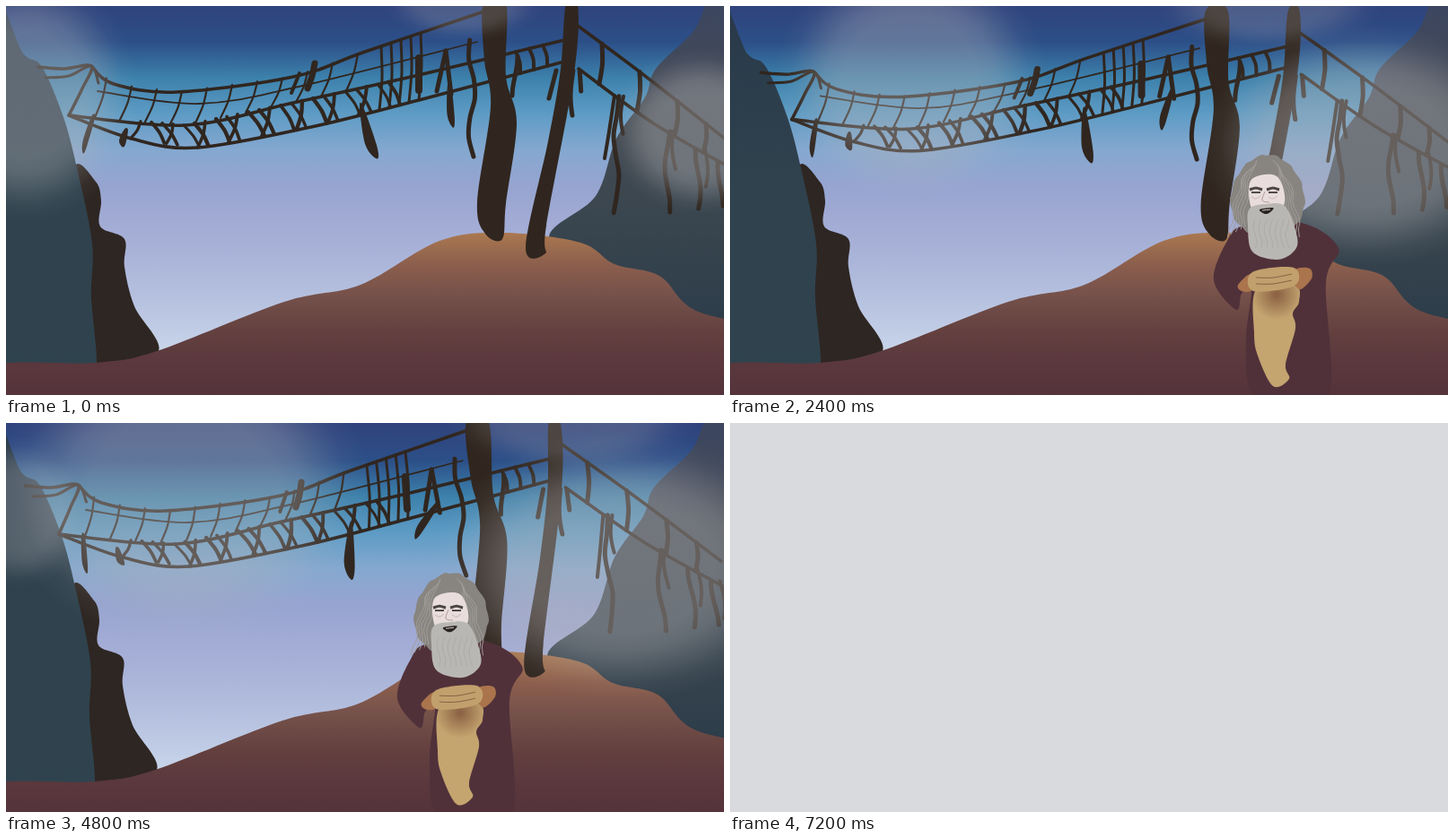
These frames come from a looping animation (800x434 px, 8000 ms). An HTML page with a canvas:

```html
<!DOCTYPE html>
<html lang="en">
<head>
<meta charset="utf-8">
<title>The old man at the rope bridge</title>
<style>
html, body { margin: 0; height: 100%; overflow: hidden; background: #d9dade; }
canvas { display: block; width: 100vw; height: 100vh; }
</style>
</head>
<body>
<canvas id="stage" width="800" height="434"></canvas>
<script>
const ctx = document.getElementById('stage').getContext('2d');
const WOOD = '#30261f', ROBE = '#50313a', MIST = '182,182,186', FOG = '217,218,222';
const STEP = 800, STEPS = 10, GROUND = 265;

// Smooth progress of a step number from one step to another.
function ease(step, from, to) {
  const t = Math.min(1, Math.max(0, (step - from) / (to - from)));
  return t * t * (3 - 2 * t);
}

// Repeatable value from 0 to 1.
function random(seed) {
  const v = Math.sin(seed * 127.1) * 43758.5;
  return v - Math.floor(v);
}

function points(text) {
  const n = text.split(/\s+/).map(Number);
  return Array.from({ length: n.length / 2 }, (_, i) => [n[2 * i], n[2 * i + 1]]);
}

const sample = (count, at) => Array.from({ length: count }, (_, i) => at(i / (count - 1)));

// Catmull-Rom curve through points.
function smooth(source, closed) {
  const p = typeof source === 'string' ? points(source) : source;
  const n = p.length, path = new Path2D();
  const at = i => closed ? p[(i + n) % n] : p[Math.max(0, Math.min(n - 1, i))];
  path.moveTo(...p[0]);
  for (let i = 0; i < (closed ? n : n - 1); i++) {
    const [a, b, c, d] = [at(i - 1), at(i), at(i + 1), at(i + 2)];
    path.bezierCurveTo(b[0] + (c[0] - a[0]) / 6, b[1] + (c[1] - a[1]) / 6,
      c[0] - (d[0] - b[0]) / 6, c[1] - (d[1] - b[1]) / 6, ...c);
  }
  return path;
}

function shape(source, fill) {
  ctx.fillStyle = fill;
  ctx.fill(smooth(source, true));
}

function line(source, width, color = WOOD) {
  ctx.strokeStyle = color;
  ctx.lineWidth = width;
  ctx.stroke(smooth(source));
}

function vertical(y0, y1, ...colors) {
  const g = ctx.createLinearGradient(0, y0, 0, y1);
  colors.forEach((color, i) => g.addColorStop(i / (colors.length - 1), color));
  return g;
}

function cloud(x, y, rx, ry, alpha, rgb = MIST) {
  ctx.save();
  ctx.translate(x, y);
  ctx.scale(rx, ry);
  const g = ctx.createRadialGradient(0, 0, 0, 0, 0, 1);
  for (let r = 0; r <= 1; r += .125)
    g.addColorStop(r, `rgba(${rgb},${alpha * (1 - ease(r, .5, 1))})`);
  ctx.fillStyle = g;
  ctx.fillRect(-1, -1, 2, 2);
  ctx.restore();
}

function landscape() {
  ctx.fillStyle = vertical(0, 400, '#30437c', '#2c4f88', '#3c81ac', '#5d9bc4', '#84a8d0',
    '#96a4d0', '#a2abd4', '#aab4d9', '#b4bfde', '#c0cce5', '#ceDAec');
  ctx.fillRect(-5, -5, 810, 444);

  shape('786 -10 766 28 724 70 712 102 680 148 657 212 605 258 650 310 830 390 830 -20',
    vertical(0, 350, '#3c4660', '#454b53', '#3a464f', '#2d3d4a'));
  shape('76 182 100 196 106 217 105 246 132 260 132 291 143 335 169 387 90 405 80 300', '#2e2622');
  shape('-20 8 20 54 40 68 64 124 80 185 96 265 95 325 101 400 90 430 -20 430',
    vertical(0, 400, '#29394a', '#2f424d', '#2f434e'));
  shape('-30 406 100 398 168 385 310 330 395 311 483 262 555 253 640 264 678 288 728 301 765 338 850 375 840 490 -30 490',
    vertical(253, 434, '#aa7850', '#8b5e4d', '#74504a', '#64413f', '#5a383d', '#55333b'));
}

const RAIL = points('95 67 120 87 190 96 320 79 400 51 530 7');
const MIDDLE = points('102 95 215 109 330 89 525 40');
const DECK = points('70 122 200 133 320 108 460 77 622 38');
const FLOOR = points('70 122 140 148 213 158 340 135 460 105 622 62');
const RIGHT_RAIL = points('637 22 712 78 806 152');
const RIGHT_DECK = points('638 70 720 130 806 180');

function height(rope, x) {
  const i = Math.max(1, rope.findIndex(p => p[0] >= x));
  const [a, b] = [rope[i - 1], rope[i]];
  return a[1] + (b[1] - a[1]) * (x - a[0]) / (b[0] - a[0]);
}

function rung(x0, top, x1, bottom, width) {
  const y0 = height(top, x0), y1 = height(bottom, x1);
  line([[x0, y0], [(x0 + x1) / 2 + 2, (y0 + y1) / 2], [x1, y1]], width);
}

// Rope end that hangs in a loose wave.
const vine = (x, y, length, width = 5, wave = 3) =>
  line(sample(7, t => [x + wave * Math.sin(t * length / 14 + x), y + t * length]), width);

function plank(x, angle, length, width) {
  ctx.save();
  ctx.translate(x, height(FLOOR, x) - 8);
  ctx.rotate(angle);
  shape([[-2, 0], [2, 0], [width, length * .75], [width * .5, length], [-width, length * .7]], WOOD);
  ctx.restore();
}

// Wooden post whose outline bulges between its key points.
const post = outline => shape(outline, WOOD);

function bridge(step) {
  const bounce = step < 4 ? 12 * Math.sin(Math.PI * step / 4) : 0;
  const lean = -17 * ease(step, 4, 6) - bounce / 4;
  const swing = ease(step, 2, 4);
  ctx.save();
  ctx.transform(1, 0, -lean / GROUND, 1 - bounce / GROUND, lean, bounce);
  ctx.lineCap = 'round';

  for (const rope of [RAIL, DECK, FLOOR, RIGHT_RAIL, RIGHT_DECK]) line(rope, 3.6);
  line(MIDDLE, 1.8);
  line('36 68 65 70 95 67 85 92 70 122', 3.5);
  line('44 80 70 78 95 67 103 86', 3);

  for (let x = 112; x < 410; x += 28) rung(x, RAIL, x - 13, DECK, 2.2);
  for (let x = 418; x < 470; x += 11) rung(x, RAIL, x - 2, FLOOR, 3);
  for (let i = 0; i < 24; i++) {
    const x = 150 + i * 12, slant = i % 3 ? 13 : -11;
    rung(x, DECK, x + slant + random(i) * 5, FLOOR, 3 + random(i + 50) * 1.5);
  }
  for (let x = 568; x < 610; x += 15) rung(x, DECK, x + 5, FLOOR, 4);

  line('344 64 341 78 336 92', 7);
  line('327 75 318 97', 4);
  line('460 58 460 94', 8);
  line('490 50 480 95', 5);
  line('490 50 496 98', 5);

  plank(97, .3 - swing * .3, 42, 3);
  plank(134, .3 - swing * .5, 20, 4);
  plank(396, -.25 + swing * .35, 60, 6);
  plank(494, -.05 + swing * .7, 48, 4);
  vine(519, 38, 130, 5, 4);
  vine(567, 56, 44);
  line('613 72 605 103', 5);
  vine(631, 72, 50, 5, 2);
  vine(640, 72, 23, 5, 1);

  for (const x of [664, 706, 748, 780]) rung(x, RIGHT_RAIL, x - 3, RIGHT_DECK, 5);
  for (const x of [680, 737, 771, 796]) {
    vine(x, height(RIGHT_DECK, x), 130 - (x - 680) * .7);
    vine(x + 8, height(RIGHT_DECK, x), 42, 4);
  }
  line('678 100 672 140 667 170', 4);

  post('532 -3 533 60 540 112 525 219 534 254 553 260 557 220 569 130 557 78 557 -3');
  post('624 -3 618 70 604 151 579 269 601 276 602 245 633 75 637 -2');
  ctx.restore();
}

function hairStrands() {
  for (const side of [-1, 1])
    for (let i = 0; i < 5; i++)
      line(sample(9, t => [
        699 + side * (9 + i * 2 + (15 + i * 2) * Math.sqrt(t)) + 2 * Math.sin(t * 14 + i),
        172 + i * 3 + t * 74
      ]), 1, '#a19d98');
}

function face() {
  shape('683 195 707 188 718 199 720 222 700 239 684 226', '#e8dcdc');
  shape('682 226 700 221 722 224 735 258 731 274 712 283 685 274 680 245', '#b9b7b4');
  for (let x = 688; x < 726; x += 6)
    line(sample(5, t => [x + 2 * Math.sin(t * 6 + x), 238 + t * 32]), .8, '#a9a7a4');

  for (const x of [689, 708]) {
    line([[x - 7, 205], [x, 203], [x + 7, 205]], 3, '#4b4644');
    line([[x - 5, 208], [x + 5, 208]], 1.6, '#2d2727');
    line([[x - 5, 213], [x, 215], [x + 5, 212]], .8, '#c4aaaa');
  }
  line('699 207 696 217 704 219', 1, '#b49b9a');
  shape('693 227 708 225 705 230 699 232', '#292323');
  line('696 228 705 227', 1, '#d8d0cc');
}

function oldMan(step) {
  ctx.save();
  ctx.translate(-206 * ease(step, 2, 4), Math.max(0, 6 * Math.sin(Math.PI * (step - 3.2) / 3)) * (step < 7));
  shape('676 245 657 262 642 306 667 339 673 321 684 317 678 378 690 440 768 440 767 309 781 270 740 242', ROBE);
  shape(sample(40, t => {
    const a = t * 2 * Math.PI, curl = 1 + .02 * Math.sin(13 * a);
    return [702 + (41 + 5 * Math.sin(a)) * Math.cos(a) * curl, 212 + 46 * Math.sin(a) * curl];
  }), '#888580');
  hairStrands();
  face();

  const paper = ctx.createRadialGradient(712, 322, 2, 712, 322, 28);
  paper.addColorStop(0, '#8d6445');
  paper.addColorStop(1, '#c4a46f');
  shape('690 315 733 312 737 330 730 343 733 360 722 400 726 416 708 424 691 390 687 364', paper);
  shape('683 299 669 311 673 318 684 317', '#aa744c');
  shape('733 294 749 293 751 304 739 316 732 309', '#aa744c');
  shape('685 297 731 292 732 312 686 318', '#c2a06d');
  for (const y of [303, 310]) line([[689, y], [708, y], [729, y - 4]], 1, '#816141');
  ctx.restore();
}

function clouds(step) {
  const drift = Math.min(1, step / 4), late = ease(step, 4, 6), low = ease(step, 6, 7);
  cloud(22 + 240 * drift - 65 * late, 100 - 25 * drift, 125 + 35 * drift + 50 * late, 140 + 30 * late, .38);
  cloud(775 - 90 * drift, 140 + 20 * drift, 105 + 105 * drift, 92 + 58 * drift, .4);
  cloud(510 + 120 * drift, -5, 90 + 50 * drift, 45 + 15 * drift, .22);
  cloud(15, 100, 75, 85, .28 * late);
  cloud(720, 340, 170, 120, .2 * low);
}

function fog() {
  ctx.fillStyle = vertical(0, 434, `rgba(${FOG},.32)`, `rgba(${FOG},.28)`, `rgba(${FOG},.1)`);
  ctx.fillRect(0, 0, 800, 434);
  cloud(220, 130, 300, 290, .5, FOG);
  cloud(640, 195, 260, 220, .48, FOG);
}

function draw(step) {
  if (step === STEPS - 1) {
    ctx.fillStyle = `rgb(${FOG})`;
    ctx.fillRect(0, 0, 800, 434);
    return;
  }
  const settle = 2 * ease(step, 4, 6);
  ctx.save();
  ctx.translate(-settle, settle);
  landscape();
  bridge(step);
  ctx.restore();
  clouds(step);
  if (step >= 2) oldMan(step);
  if (step === STEPS - 2) fog();
}

const start = performance.now();
function tick() {
  draw(Math.floor((performance.now() - start) / STEP) % STEPS);
  requestAnimationFrame(tick);
}
tick();
</script>
</body>
</html>
```
